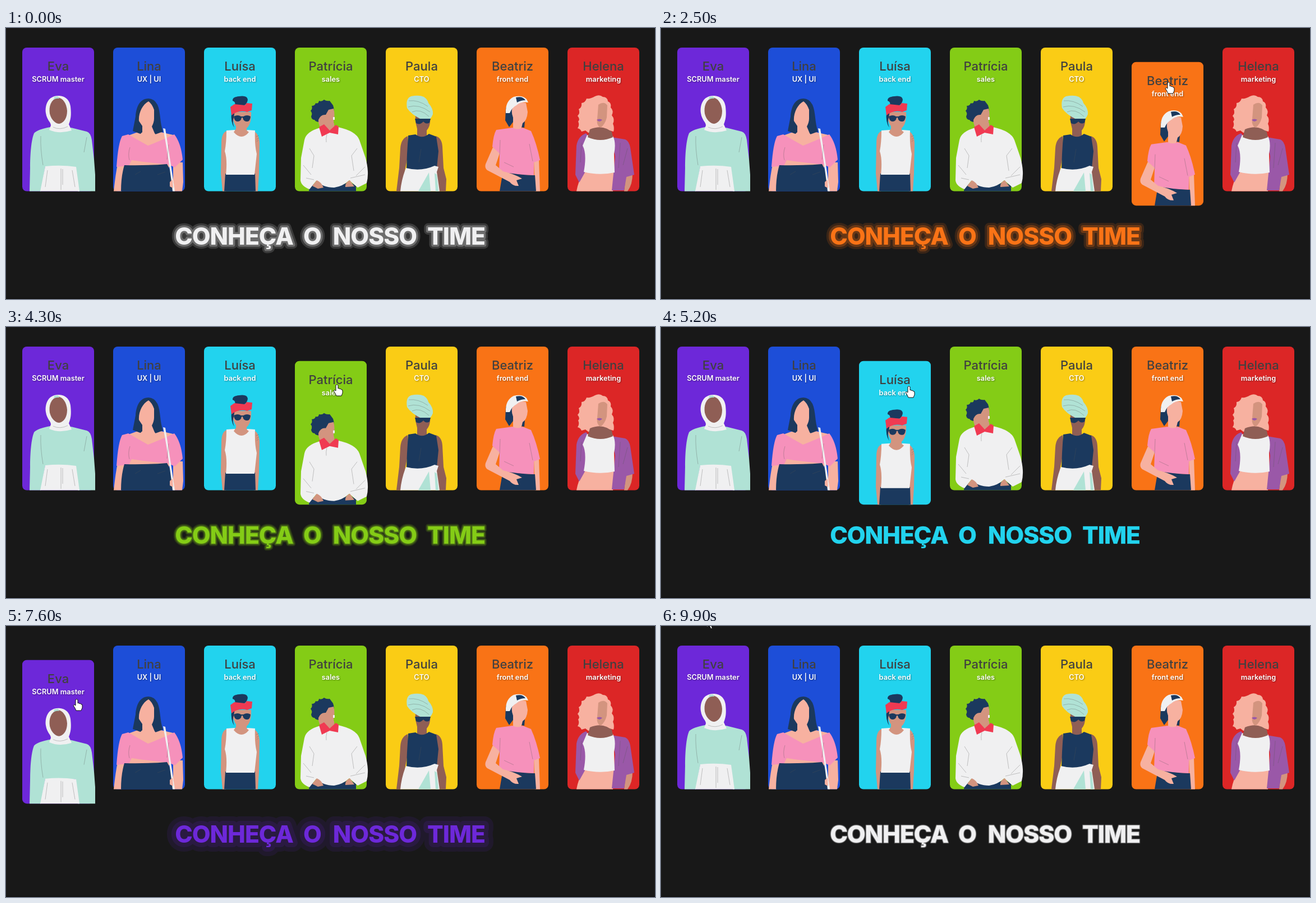
Write an HTML page that moves like this. It is 1157 px wide and 484 px high and loops after 10000 ms.

```html
<!DOCTYPE html>
<html lang="pt">
<head>
<meta charset="utf-8">
<title>Conheça o nosso time</title>
<style>
  html, body { margin: 0; width: 100%; height: 100%; overflow: hidden; background: #181818; }
  svg { display: block; font-family: Inter, "Open Sans", sans-serif; text-anchor: middle; }
  .name { font-size: 22px; font-weight: 500; fill: #404040; }
  .role { font-size: 12.8px; font-weight: 600; fill: #fff; filter: drop-shadow(1px 1px 1px rgba(0,0,0,.4)); }
  .title { font-size: 42.5px; font-weight: 800; letter-spacing: -1px; stroke-linejoin: round; }
  .fold { fill: none; stroke: #555; stroke-width: .6; opacity: .55; }
</style>
</head>
<body>
<svg id="stage" width="1157" height="484" viewBox="0 0 1157 484"></svg>
<script>
const LOOP = 10000, CARD_W = 128, CARD_TOP = 35, DROP = 25.7;
const WHITE = '#f0f0f1', MINT = '#b0e2d5', NAVY = '#1b395e', PINK = '#f691bb', LIGHT = '#f7b1a0',
      TAN = '#d3947f', BROWN = '#8f5e55', RED = '#f03a52', VIOLET = '#9a58a8';

// Each figure is a stack of [colour, path]; colour 'fold' marks thin cloth lines.
const team = [
  { name: 'Eva', role: 'SCRUM master', color: '#6d28d9', figure: [
    [MINT, 'M79 177Q96 189 116 178L144 185Q151 187 153 200L157 235L159 262V291.5H128L124 248H70L62 291.5H42L43 250C43 225 45 200 50 188Q56 181 79 177Z'],
    [WHITE, 'M70 247Q98 244 125 248L131 291.5H61Z'],
    [WHITE, 'M93 121C75 121 69 138 71 152C73 165 80 168 80 174L77 182Q95 190 117 183L112 172C117 160 116 150 115 140C113 126 103 121 93 121Z'],
    [BROWN, 'M92 124C80 128 76 140 78 153C81 165 89 171 95 171C104 169 109 160 109 148C108 134 101 125 92 124Z'],
    [MINT, 'M86 123L93 122L95 126Q90 125 85 128Z'],
    ['fold', 'M62 193Q61 215 66 245M144 195L139 222M74 254L70 284M98 251V289M101 252V280M118 254L123 284M84 177Q96 183 110 176']] },
  { name: 'Lina', role: 'UX | UI', color: '#1d4ed8', figure: [
    [LIGHT, 'M240 184H267L298 191L310 220L290 250H222L203 220L210 195ZM200 240H222L208 270L206 291.5H192C194 275 196 255 200 240ZM298 240H315L316 275L314 291.5H298Z'],
    [NAVY, 'M254 126C238 126 232 142 231 158L226 184L242 190Q254 184 266 190L280 185C274 170 276 150 270 137Q264 126 254 126Z'],
    [LIGHT, 'M254 131C243 137 236 152 237 166L243 175V186L232 196H272L265 188L260 176Q264 168 264 162V146Q260 135 254 131Z'],
    [PINK, 'M207 193L218 190Q235 200 253 210Q272 203 300 190Q312 205 315 235L301 249L290 244Q250 240 224 236L219 246L197 248Q200 205 207 193Z'],
    [NAVY, 'M211 245Q250 246 287 243Q298 260 300 291.5H205Q205 265 211 245Z'],
    [WHITE, 'M280 179L284 180Q292 230 301 291.5H297Q289 225 280 179Z'],
    [LIGHT, 'M292 275L297 271L298 286L292 283Z'],
    ['fold', 'M221 213Q217 225 220 236M290 208L287 235M240 256L230 262M270 262L284 257']] },
  { name: 'Luísa', role: 'back end', color: '#22d3ee', figure: [
    [TAN, 'M393 184Q384 188 384 205L383 260L386 291.5H392L394 230ZM441 184Q451 188 452 205L451 260L449 291.5H442Z'],
    [NAVY, 'M391 260H444L445 291.5H389Z'],
    [WHITE, 'M393 183L408 182Q419 202 430 182L444 183Q443 210 447 225L443 262H392Q395 235 390 220Q393 205 393 183Z'],
    [TAN, 'M410 170H429V183L433 186Q420 202 406 186L410 180ZM404 150H437Q438 170 430 178Q422 184 412 178Q403 168 404 150Z'],
    [NAVY, 'M404 130Q403 123 416 122Q430 120 431 128Q430 135 425 138H408Q410 132 404 130ZM402 151L408 148L406 160Q403 168 407 178Q400 168 402 151Z'],
    [RED, 'M400 141L407 136L426 138L429 134L439 135L438 147L430 150Q414 146 402 156Z'],
    [NAVY, 'M406 158Q413 154 419 158H423Q430 154 436 158Q435 168 429 167Q423 167 422 160H420Q419 167 413 167Q407 167 406 158Z'],
    ['fold', 'M446 194L451 192M447 199L451 196M447 203L450 200']] },
  { name: 'Patrícia', role: 'sales', color: '#84cc16', figure: [
    [NAVY, 'M541 282L556 276Q585 290 612 274L624 282V291.5H540Z'],
    [WHITE, 'M560 178L592 177Q624 184 630 200L641 232Q648 258 643 277L627 285L612 272Q600 283 585 285Q565 285 553 273L541 288Q526 282 525 272L526 232L532 200Q535 185 560 178Z'],
    [TAN, 'M546 282L554 272Q562 275 566 285L556 287ZM605 284Q604 276 613 272L621 283ZM560 168L585 170L586 186H564Z'],
    [NAVY, 'M544 158Q547 152 543 148Q547 144 545 139Q551 139 552 134Q557 136 558 130Q563 132 567 128Q571 131 577 130Q580 134 583 138Q586 146 583 152L566 158L560 168Q552 168 550 164Q545 164 544 158Z'],
    [TAN, 'M584 144Q587 155 584 166Q586 176 578 182L566 184Q556 175 557 164Q561 154 570 155L575 146Z'],
    [RED, 'M558 177L567 172L577 183L588 173L593 176L592 190L577 187L563 194Z'],
    [WHITE, 'M583 159H586V164H583Z'],
    ['fold', 'M541 215L549 228L546 250M530 245L544 262M626 215L616 228L620 255M640 248L624 264M572 190Q570 198 571 204M535 268L549 271M614 268L640 262']] },
  { name: 'Paula', role: 'CTO', color: '#facc15', figure: [
    [BROWN, 'M716 193Q704 198 703 215L701 250L696 291.5H706L712 250L718 220ZM766 193Q777 196 778 212L780 250L785 270L784 291.5H771L767 255ZM730 156Q742 150 756 162Q757 175 750 183V197H733V180Q729 168 730 156Z'],
    [NAVY, 'M717 192L730 190Q742 199 754 189L767 194L771 220L768 250Q740 258 714 252L715 225Z'],
    [WHITE, 'M713 250Q740 257 764 246L771 248L768 257L773 291.5H703Q705 270 713 250Z'],
    [MINT, 'M754 258L757 291.5H735ZM764 259L768 262L771 291.5H766Z'],
    [MINT, 'M740 163Q722 154 715 143Q712 126 722 122Q736 119 745 123Q752 128 753 134Q762 144 761 154Q757 165 748 166Z'],
    [NAVY, 'M729 162H757L755 169Q749 173 744 167Q738 174 731 170Z'],
    ['fold', 'M718 130Q735 128 752 140M717 141Q736 135 756 150M724 150Q738 143 754 158M740 216L736 240']] },
  { name: 'Beatriz', role: 'front end', color: '#f97316', figure: [
    [NAVY, 'M891 142L890 165L897 177L910 160V142ZM916 165L925 166L924 178L917 177Z'],
    [LIGHT, 'M941 236L950 235L952 291.5H943ZM903 142Q912 130 927 134L930 150Q929 165 921 170L918 182H904V160Q900 150 903 142Z'],
    [WHITE, 'M891 152Q890 130 905 123Q920 119 928 127L931 133Q918 131 910 138Q902 142 898 152Z'],
    [NAVY, 'M909 124Q921 121 926 129Q918 129 911 133Z'],
    [NAVY, 'M886 256Q915 262 943 263L945 291.5H880Z'],
    [PINK, 'M903 178Q912 183 921 178L936 184Q946 206 952 236L941 240V263Q910 262 879 256L880 226L867 212Q869 190 874 182Z'],
    [LIGHT, 'M868 213L880 224L873 245L886 256Q905 260 920 269L910 272L914 282Q904 283 898 275L858 254Q853 250 855 243Z'],
    ['fold', 'M881 200L880 226M933 207L939 238M888 240L905 248']] },
  { name: 'Helena', role: 'marketing', color: '#dc2626', figure: [
    [LIGHT, 'M1029 256H1085L1082 291.5H1017Q1020 275 1029 256Z'],
    [TAN, 'M1105 264L1117 260Q1117 280 1108 291.5H1102Z'],
    [VIOLET, 'M1034 188Q1020 193 1017 210L1015 262L1022 276L1032 258L1035 220L1040 195ZM1080 195L1104 199Q1111 202 1113 214L1120 262L1106 266L1102 290L1080 290L1086 230Z'],
    [WHITE, 'M1036 191Q1058 206 1082 193Q1088 205 1084 225L1085 258Q1058 264 1030 257Q1036 225 1028 210Z'],
    [LIGHT, 'M1050 122Q1058 118 1064 123Q1072 123 1073 131Q1080 134 1078 142Q1084 148 1080 156Q1086 163 1082 171Q1085 178 1083 185L1076 183L1072 187L1038 187L1033 183L1026 185Q1024 180 1019 179Q1023 173 1020 167Q1024 163 1019 157Q1024 152 1021 145Q1027 142 1026 134Q1033 133 1035 126Q1042 127 1050 122Z'],
    [BROWN, 'M1041 181Q1058 174 1071 180L1080 185L1082 195Q1060 205 1037 195Z'],
    [TAN, 'M1056 137Q1066 130 1072 138L1071 160Q1068 172 1060 178Q1052 174 1054 163Z'],
    [VIOLET, 'M1053 164Q1058 161 1063 164Q1058 170 1053 164Z'],
    ['fold', 'M1026 205L1024 240M1108 215L1100 245M1095 205L1092 250']] }
];
team.forEach((card, i) => card.x = 29 + Math.round(i * 161.92));

const ARROW = 'M0 0V16L4 12.5L7 19L9.5 18L6.7 11.7H12Z';
const HAND = 'M-2 1Q0-2 2 1V7Q4 5 5 8Q7 6 8 9Q10 8 10 11V15Q9 17 8 20H-1Q-3 15 -6 11Q-5 8 -2 11Z';

// [time, x, y] of the pointer tip
const pointerPath = [
  [0, 180, -24], [100, 239, -2], [300, 858, 16], [500, 985, 28], [900, 1075, 93], [1800, 1075, 93],
  [2500, 905, 97], [3000, 905, 97], [3400, 752, 99], [3950, 752, 99], [4250, 590, 103], [4850, 590, 103],
  [5150, 442, 106], [5750, 442, 106], [6150, 283, 118], [6600, 283, 118], [7300, 190, 125],
  [7550, 126, 131], [7700, 126, 131], [8000, 105, 131], [8300, 105, 131], [8600, 114, 126],
  [9100, 106, 122], [9900, 82, -14], [10000, 80, -24]];
// [time, strength] of the title glow
const glowPath = [
  [0, .45], [1200, .93], [1700, 1], [2200, 1], [2750, .1], [3500, .48], [4000, .6], [4400, .15],
  [5150, 0], [6200, .45], [7300, 1], [7800, 1], [9900, .1], [10000, .1]];

const sample = (path, t) => {
  const i = path.findIndex(p => p[0] > t), a = path[i - 1], b = path[i];
  const k = (t - a[0]) / (b[0] - a[0]);
  return a.slice(1).map((v, n) => v + (b[n + 1] - v) * k);
};

const drawPart = ([color, d]) =>
  color === 'fold' ? `<path class="fold" d="${d}"/>` : `<path fill="${color}" d="${d}"/>`;

const drawCard = ({ name, role, color, figure, x }) => `<g class="card">
  <rect x="${x}" y="${CARD_TOP}" width="${CARD_W}" height="256.5" rx="8" fill="${color}"/>
  <text class="name" x="${x + 64}" y="76">${name}</text>
  <text class="role" x="${x + 64}" y="96">${role}</text>
  ${figure.map(drawPart).join('')}</g>`;

const words = [['CONHEÇA', 406.5], ['O', 546], ['NOSSO', 657.5], ['TIME', 802.5]];
const title = `<text class="title" y="387">${words.map(([w, x]) => `<tspan x="${x}">${w}</tspan>`).join('')}</text>`;

const stage = document.getElementById('stage');
stage.innerHTML = `<rect y="482" width="1157" height="2" fill="#111"/>
  ${title.repeat(3)}${team.map(drawCard).join('')}
  <path id="pointer" stroke="#111" stroke-linejoin="round" fill="#fff"/>`;
const cards = stage.querySelectorAll('.card');
const [outer, inner, face] = stage.querySelectorAll('.title');
const pointer = document.getElementById('pointer');

const setHalo = (el, color, width, opacity) => {
  el.setAttribute('fill', color);
  el.setAttribute('stroke', color);
  el.setAttribute('stroke-width', width);
  el.setAttribute('opacity', opacity);
};

function render(now) {
  const t = now % LOOP;
  const [x, y] = sample(pointerPath, t), [glow] = sample(glowPath, t);
  const hovered = team.findIndex(c => y >= CARD_TOP && x >= c.x && x <= c.x + CARD_W);
  const color = hovered < 0 ? WHITE : team[hovered].color;

  cards.forEach((el, i) => el.setAttribute('transform', `translate(0 ${i === hovered ? DROP : 0})`));
  setHalo(outer, color, 32 * glow, .2 - .1 * glow);
  setHalo(inner, color, 16 * glow, .4 - .27 * glow);
  face.setAttribute('fill', color);
  pointer.setAttribute('d', hovered < 0 ? ARROW : HAND);
  pointer.setAttribute('transform', `translate(${x} ${y})`);
  requestAnimationFrame(render);
}
requestAnimationFrame(render);
</script>
</body>
</html>
```
